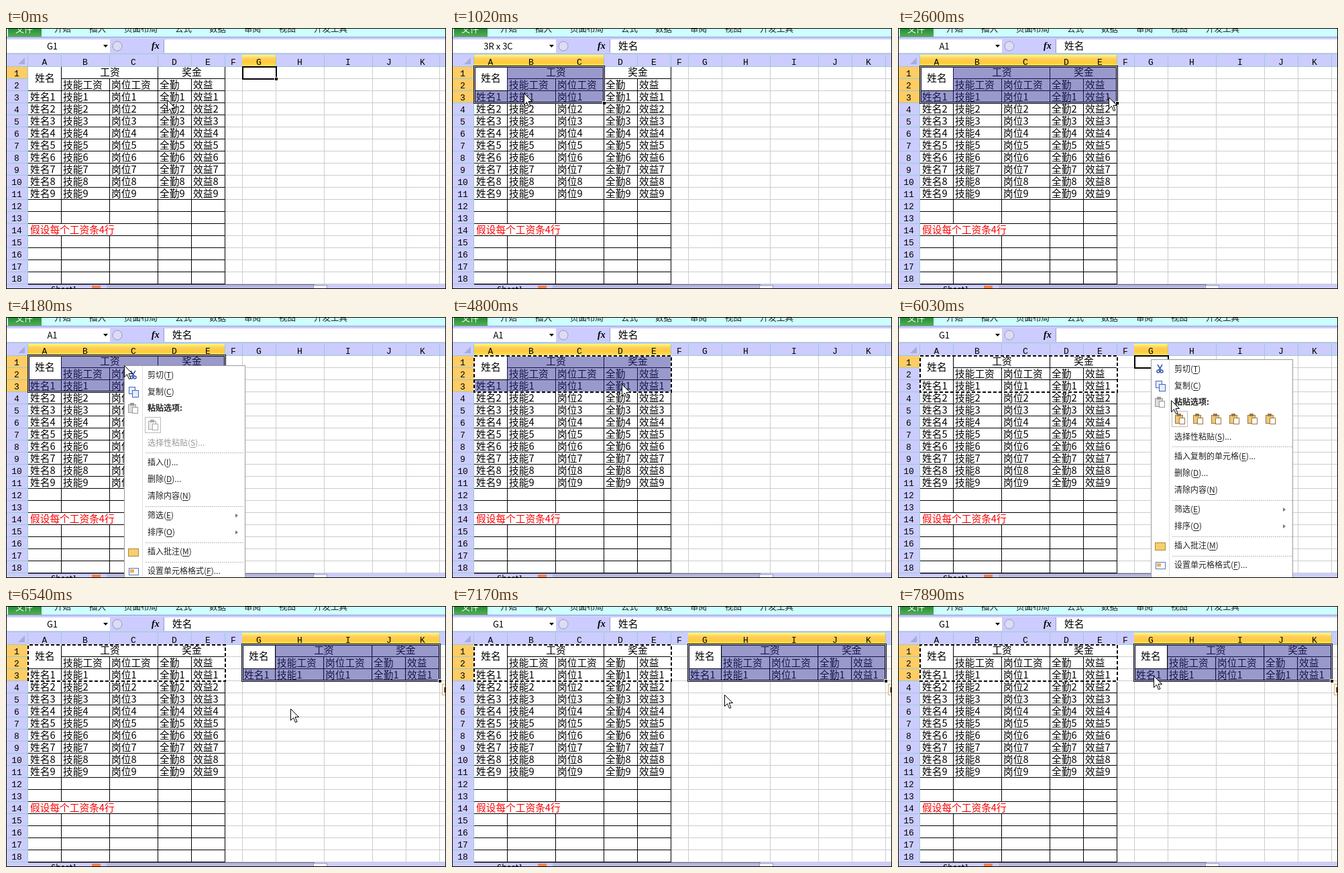
Recreate the animation shown at these times as an HTML page with a canvas. Size 656 by 389 pixels, loop 7.99 s.

```html
<!DOCTYPE html>
<html lang="zh-CN">
<meta charset="utf-8">
<style>
html, body { margin: 0; width: 656px; height: 389px; overflow: hidden; background: #fff }
canvas { display: block }
</style>
<canvas id="stage" width="656" height="389"></canvas>
<script>
const c = document.getElementById('stage').getContext('2d');
const LOOP = 7990;
const CJK = '"Noto Sans CJK SC", "Noto Sans CJK", sans-serif';
const CELL = 14.7, EDGE = '#99cccc';
const COLS = [33, 82, 154, 226, 276, 326, 352, 402, 474, 546, 596, 646, 718];
const rowY = r => 57 + 18 * r;

// The picture only changes in bursts: start, end, number of steps
const BURSTS = [[100, 810, 8], [1020, 1730, 8], [2600, 3110, 6], [3870, 4280, 5], [4490, 5210, 8],
  [5310, 5720, 5], [5930, 6650, 8], [6860, 7370, 6], [7580, 7890, 4]];

// Pointer path: time, x, y
const PATH = [[0, 240, 107], [506, 52, 73], [607, 55, 80], [810, 78, 92], [1020, 107, 97], [1325, 270, 101],
  [1528, 317, 106], [1730, 317, 107], [2600, 314, 103], [3008, 171, 82], [3110, 176, 80], [3870, 176, 76],
  [3972, 176, 72], [4178, 176, 72], [4280, 184, 82], [4490, 203, 102], [4593, 214, 112], [4695, 224, 109],
  [5210, 370, 66], [5412, 377, 63], [5720, 377, 63], [5930, 390, 94], [6135, 424, 153], [6548, 424, 153],
  [6650, 422, 143], [6860, 420, 141], [7370, 397, 126], [7580, 393, 121], [7890, 381, 104]];

function stepTime(t) {
  const b = BURSTS.filter(b => b[0] <= t).pop();
  if (!b) return 0;
  const step = (b[1] - b[0]) / (b[2] - 1);
  return Math.min(b[1], b[0] + step * Math.floor((t - b[0] + 10) / step));
}

function pointer(t) {
  let i = 0;
  while (i < PATH.length - 2 && PATH[i + 1][0] <= t) i++;
  const [a, b] = [PATH[i], PATH[i + 1]];
  const k = Math.min(1, (t - a[0]) / (b[0] - a[0]));
  return [1, 2].map(n => Math.round(a[n] + (b[n] - a[n]) * k));
}

function rect(x, y, w, h, color) { c.fillStyle = color; c.fillRect(x, y, w, h); }
function box(x, y, w, h, color, line = 1) {
  const d = line % 2 / 2;
  c.strokeStyle = color; c.lineWidth = line;
  c.strokeRect(x + d, y + d, w, h);
}
function poly(color, ...p) {
  c.beginPath();
  for (let i = 0; i < p.length; i += 2) c.lineTo(p[i], p[i + 1]);
  c.closePath(); c.fillStyle = color; c.fill();
}
function text(s, x, y, size = CELL, { color = '#000', align = 'left', weight = '', font = CJK } = {}) {
  c.font = `${weight} ${size}px ${font}`;
  c.textAlign = align; c.textBaseline = 'alphabetic'; c.fillStyle = color;
  c.fillText(s, x, Math.round(y + size * .37));
}
function gradient(y0, y1, ...colors) {
  const g = c.createLinearGradient(0, y0, 0, y1);
  colors.forEach((color, i) => g.addColorStop(i / (colors.length - 1), color));
  return g;
}

function ribbon(label, formula) {
  rect(0, 0, 656, 58, '#ccccff');
  rect(1, 1, 654, 12, '#ccffff');
  rect(3, 1, 50, 12, gradient(0, 13, '#268a36', '#4fb052'));
  text('文件', 14, 1, 13, { color: '#fff' });
  [['开始', 72], ['插入', 124], ['页面布局', 176], ['公式', 252], ['数据', 303], ['审阅', 355],
    ['视图', 407], ['开发工具', 459]].forEach(([s, x]) => text(s, x, 1, 12.5, { color: '#222' }));
  rect(0, 13, 656, 1, '#9999cc');
  rect(1, 17, 154, 20, '#fff');
  rect(236, 17, 419, 20, '#fff');
  rect(235, 17, 1, 20, '#9999cc');
  rect(0, 38, 656, 1, EDGE);
  text(label, 69, 27, 13, { align: 'center' });
  poly('#000', 145, 25, 152, 25, 148.5, 29);
  c.beginPath(); c.arc(166, 27, 7, 0, 7);
  c.fillStyle = '#dcdcf4'; c.fill();
  c.strokeStyle = '#9999bb'; c.lineWidth = 1; c.stroke();
  text('fx', 217, 26, 14, { weight: 'italic bold', font: '"Liberation Serif", serif' });
  text(formula, 248, 27);
}

function headers(from, to, rows) {
  const head = { align: 'center', font: '"Liberation Mono", monospace' };
  rect(0, 39, 33, 343, '#ccccff');
  for (let i = 0; i < 12; i++) {
    const x = COLS[i], w = COLS[i + 1] - x;
    if (i >= from && i <= to) rect(x, 40, w, 17, gradient(40, 57, '#ffff66', '#ffcc66', '#ffcc33', '#ffe066'));
    rect(x + w, 40, 1, 17, EDGE);
    if (i < 11) text('ABCDEFGHIJK'[i], x + w / 2, 50, 13, head);
  }
  for (let r = 0; r < 18; r++) {
    if (r < rows) rect(1, rowY(r) + 1, 31, 17, '#ffcc66');
    rect(1, rowY(r + 1), 32, 1, EDGE);
    text(r + 1, 16, rowY(r) + 10, 13, head);
  }
  rect(32, 40, 1, 342, EDGE);
  rect(1, 57, 654, 1, EDGE);
  poly('#aaaadd', 28, 44, 28, 54, 18, 54);
}

function grid() {
  rect(33, 58, 622, 324, '#fff');
  for (const x of COLS.slice(5, 12)) rect(x, 58, 1, 324, '#ccc');
  for (let r = 1; r < 19; r++) rect(327, rowY(r), 328, 1, '#ccc');
}

// Pay table with merged title cells; dx shifts the pasted copy
function table(dx, rows) {
  c.save(); c.translate(dx, 0);
  for (let r = 1; r <= rows; r++) {
    const x = r == 1 ? 82 : 33;
    rect(x, rowY(r), 327 - x, 1, '#000');
  }
  rect(33, rowY(1), 49, 1, '#fff');
  for (let i = 1; i < 6; i++)
    for (let r = 0; r < rows; r++) {
      const merged = r == 0 && (i == 2 || i == 4), spill = r == 13 && i < 3;
      if (merged) rect(COLS[i], 58, 1, 17, '#fff');
      else if (!spill) rect(COLS[i], rowY(r) + 1, 1, 18, '#000');
    }
  const mid = { align: 'center' };
  text('姓名', 58, 75, CELL, mid);
  text('工资', 155, 66, CELL, mid);
  text('奖金', 277, 66, CELL, mid);
  ['', '技能工资', '岗位工资', '全勤', '效益'].forEach((s, i) => text(s, COLS[i] + 3, 85));
  for (let r = 2; r < Math.min(rows, 11); r++)
    ['姓名', '技能', '岗位', '全勤', '效益'].forEach((s, i) => text(s + (r - 1), COLS[i] + 3, rowY(r) + 10));
  if (rows > 13) text('假设每个工资条4行', 36, 301, CELL, { color: '#f00' });
  c.restore();
}

// Translucent veil over all selected cells but the active one
function tint(from, to, rows) {
  if (rows < 3) return;
  const veil = 'rgba(42, 42, 149, .48)', x = COLS[from], active = COLS[from + 1];
  rect(active, 58, COLS[to + 1] - active, 54, veil);
  rect(x, 94, active - x, 18, veil);
}

function outline(from, to, rows) {
  const x = COLS[from], x2 = COLS[to + 1], y2 = rowY(rows);
  if (rows > 1) {
    box(x, 57, x2 - x, y2 - 57, '#000', 3);
    box(x, 57, x2 - x, y2 - 57, '#ccccff');
  } else box(x + 1, 58, x2 - x, y2 - 57, '#000', 2);
  rect(x2 - 2, y2 - 2, 5, 5, '#fff');
  rect(x2 - 1, y2 - 1, 4, 4, '#000');
}

function ants(t) {
  box(33, 58, 294, 54, '#fff', 2);
  c.setLineDash([5, 3]);
  c.lineDashOffset = -Math.round(t / 100) * 2;
  box(33, 58, 294, 54, '#000', 2);
  c.setLineDash([]);
}

function tabs() {
  rect(0, 382, 656, 7, '#ccccff');
  rect(33, 382, 427, 1, '#666699');
  c.save(); c.beginPath(); c.rect(50, 383, 70, 5); c.clip();
  text('Sheet1', 67, 390, 12);
  c.restore();
  rect(128, 384, 13, 4, '#f08050');
  rect(150, 383, 308, 5, '#b8b8dd');
  rect(458, 383, 20, 5, '#eeeeff');
  box(458, 383, 20, 6, '#9999cc');
}

function item(s, x, y, color = '#222', weight = '') {
  text(s, x, y, 12, { color, weight });
  const k = s.indexOf('(') + 1;
  if (k) rect(x + c.measureText(s.slice(0, k)).width, y + 6, c.measureText(s[k]).width, 1, color);
}

function clipboard(x, y, color, edge) {
  rect(x, y + 2, 11, 12, color); box(x, y + 2, 11, 12, edge);
  rect(x + 3, y, 6, 4, edge);
  rect(x + 6, y + 6, 8, 9, '#fff'); box(x + 6, y + 6, 8, 9, edge);
}

function menu(x, y, w, copied, hover) {
  c.save(); c.translate(x, y);
  rect(0, 0, w, 400, '#fff');
  rect(27, 1, 1, 400, '#ddd');
  box(0, 0, w - 1, 400, '#999');
  if (hover) { rect(3, 28, w - 6, 23, '#ffeeaa'); box(3, 28, w - 7, 22, '#e8c050'); }
  [['剪切(T)', 15], ['复制(C)', 40], ['插入' + (copied ? '复制的单元格(E)...' : '(I)...'), 145],
    ['删除(D)...', 170], ['清除内容(N)', 195], ['筛选(E)', 224], ['排序(O)', 249], ['插入批注(M)', 278],
    ['设置单元格格式(F)...', 307]].forEach(([s, dy]) => item(s, 35, dy));
  item('粘贴选项:', 35, 64, '#222', 'bold');
  item('选择性粘贴(S)...', 35, 116, copied ? '#222' : '#999');
  for (const dy of [130, 210, 264, 293])
    for (let sx = 32; sx < w - 2; sx += 3) rect(sx, dy, 2, 1, '#bbb');
  for (const dy of [224, 249]) poly('#777', w - 15, dy - 3, w - 11, dy, w - 15, dy + 3);
  for (let i = 0; i < (copied ? 6 : 1); i++) {
    const bx = 31 + i * 27;
    if (i == 0) box(bx, 77, 23, 23, '#bbb');
    clipboard(bx + 5, 81, copied ? '#f0c878' : '#eee', copied ? '#997744' : '#aaa');
  }
  // scissors, copy, paste, comment and format icons
  c.strokeStyle = '#3355aa'; c.lineWidth = 1.5; c.beginPath();
  c.moveTo(10, 8); c.lineTo(15, 16); c.moveTo(17, 8); c.lineTo(12, 16); c.stroke();
  for (const cx of [11, 16]) { c.beginPath(); c.arc(cx, 18, 2, 0, 7); c.stroke(); }
  for (const d of [0, 5]) { rect(7 + d, 32 + d, 9, 10, '#e4eeff'); box(7 + d, 32 + d, 9, 10, '#4466bb'); }
  clipboard(6, 56, '#ddd', '#999');
  rect(6, 273, 15, 11, '#f5cf70'); box(6, 273, 15, 11, '#b08830');
  rect(7, 302, 14, 10, '#fff'); box(7, 302, 14, 10, '#5577bb');
  rect(9, 304, 6, 5, '#f0b050');
  c.restore();
}

function arrow(x, y) {
  c.save(); c.translate(x + .5, y + .5);
  poly('#fff', 0, 0, 0, 17, 4, 13, 7, 20, 9.5, 19, 6.5, 12, 12, 12);
  c.strokeStyle = '#000'; c.lineWidth = 1; c.stroke();
  c.restore();
}

// Selection as first column, last column, rows
function selection(t) {
  if (t < 500) return [6, 6, 1];
  if (t < 600) return [0, 0, 2];
  if (t < 5500) return [0, [700, 1000, 1100, 1200].filter(s => t >= s).length, 3];
  return t < 6300 ? [6, 6, 1] : [6, 10, 3];
}

function draw(t) {
  const sel = selection(t), [from, to, rows] = sel;
  const dragging = t >= 600 && t < 1600, copied = t >= 4690, pasted = t >= 6300;
  ribbon(dragging ? `3R x ${to + 1}C` : from ? 'G1' : 'A1', rows > 1 ? '姓名' : '');
  grid();
  headers(...sel);
  table(0, 18);
  if (pasted) table(319, 3);
  tint(...sel);
  if (!copied || from) outline(...sel);
  if (copied) ants(t);
  if (pasted) {
    rect(650, 116, 5, 17, '#fff'); box(650, 116, 8, 16, '#e8a850');
    rect(653, 121, 2, 8, '#555');
  }
  tabs();
  if (t >= 4070 && t < 4690) menu(176, 72, 181, false, t > 4400);
  if (t >= 5600 && !pasted) menu(377, 63, 212, true, false);
  arrow(...pointer(t));
  box(0, 0, 655, 388, '#000');
}

function tick() {
  draw(stepTime(performance.now() % LOOP));
  requestAnimationFrame(tick);
}
tick();
</script>
</html>
```
